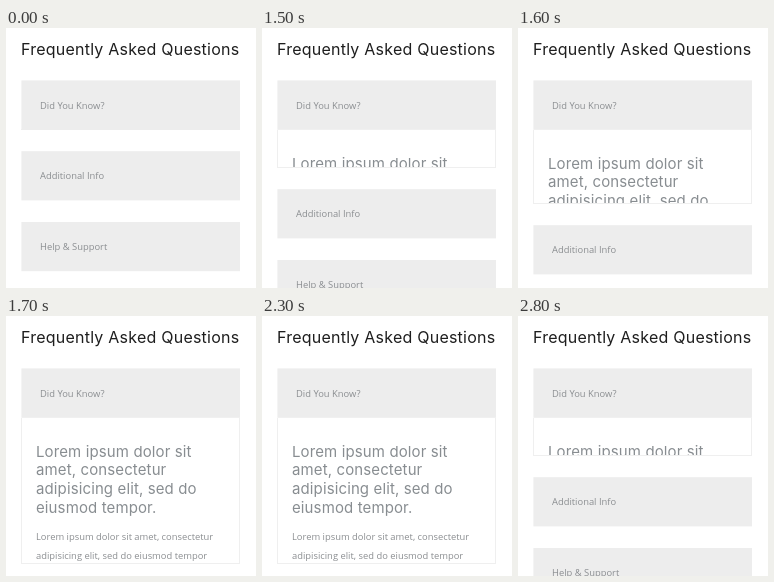
An HTML page for the animation above (2900 ms loop, 250 by 260 pixels).

```html
<!DOCTYPE html>
<html lang="en">
<head>
<meta charset="utf-8">
<title>Frequently Asked Questions</title>
<style>
  html, body { margin: 0; width: 100%; height: 100%; overflow: hidden; background: #fff; }
  svg { display: block; }
  text { font: 9.4px "Open Sans", sans-serif; fill: #8b8e91; }
  .title { font: 16px Inter, sans-serif; letter-spacing: .23px; fill: #1e1e1e; }
  .lead { font: 15px Inter, sans-serif; letter-spacing: .12px; fill: #888d91; }
  .bar { fill: #ededed; }
  .frame { fill: none; stroke: #efefef; }
</style>
</head>
<body>
<svg width="250" height="260" viewBox="0 0 250 260">
  <text class="title" x="15" y="26.5">Frequently Asked Questions</text>

  <g id="answer">
    <path class="frame" d="M15.5 102V260M233.5 102V260"/>
    <text class="lead" x="30" y="140.6">Lorem ipsum dolor sit</text>
    <text class="lead" x="30" y="159.4">amet, consectetur</text>
    <text class="lead" x="30" y="178.2">adipisicing elit, sed do</text>
    <text class="lead" x="30" y="197">eiusmod tempor.</text>
    <text x="30" y="224">Lorem ipsum dolor sit amet, consectetur</text>
    <text x="30" y="242.8">adipisicing elit, sed do eiusmod tempor</text>
  </g>

  <!-- The white sheet hides the closed part of the answer. -->
  <g id="below">
    <rect x="0" y="102" width="250" height="160" fill="#fff"/>
    <path class="frame" d="M15 101.5H234"/>
    <rect class="bar" x="15.4" y="123.2" width="218.6" height="49.2"/>
    <text x="34" y="151">Additional Info</text>
    <rect class="bar" x="15.4" y="194" width="218.6" height="49.2"/>
    <text x="34" y="222">Help &amp; Support</text>
  </g>

  <rect class="bar" x="15.4" y="52.4" width="218.6" height="49.4"/>
  <text x="34" y="80.5">Did You Know?</text>
</svg>
<script>
  const LOOP = 2900;
  // [start in ms, open height in px]
  const steps = [[0, 0], [1500, 38], [1600, 74], [1700, 146], [2700, 74], [2800, 38], [LOOP, 0]];

  const keyframes = steps.map(([time, height]) => ({
    offset: time / LOOP,
    transform: `translateY(${height}px)`,
    easing: 'steps(1, end)'
  }));

  document.getElementById('below').animate(keyframes, { duration: LOOP, iterations: Infinity });
</script>
</body>
</html>
```
